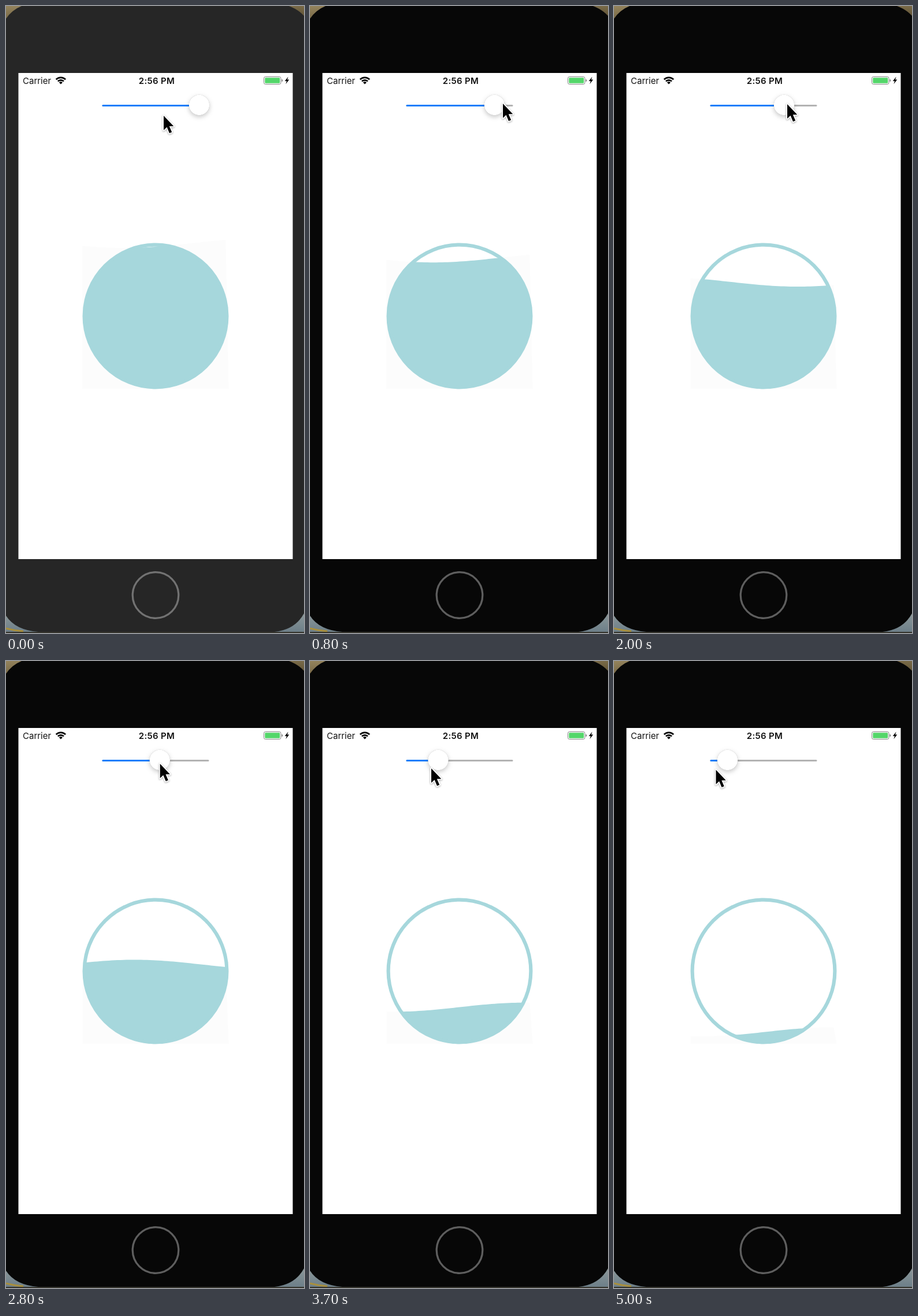
An HTML page for the animation above (5.1 s loop, 516 by 1086 pixels).

```html
<!DOCTYPE html>
<html lang="en">
<head>
<meta charset="utf-8">
<title>Water level slider</title>
<style>
  html, body { margin: 0; width: 100%; height: 100%; overflow: hidden; background: #070707; }
  svg { display: block; width: 516px; height: 1086px; }
  text { font: 15px Inter, Roboto, sans-serif; fill: #111; }
  .clock { font-weight: 600; letter-spacing: .3px; text-anchor: middle; }
  .wifi path { fill: none; stroke: #000; stroke-width: 2.7; }
  #thumb circle { filter: drop-shadow(0 3px 4px rgba(0, 0, 0, .17)) drop-shadow(0 0 .7px rgba(0, 0, 0, .35)); }
  #cursor { filter: drop-shadow(0 1.5px 1.5px rgba(0, 0, 0, .35)); }
</style>
</head>
<body>
<svg viewBox="0 0 516 1086">
  <defs>
    <clipPath id="disc"><circle cx="259" cy="537" r="125"/></clipPath>
    <linearGradient id="sand" x2="1" y2="1">
      <stop stop-color="#94835c"/><stop offset="1" stop-color="#5d5033"/>
    </linearGradient>
    <linearGradient id="sea" x2="0" y2="1">
      <stop stop-color="#8b9799"/><stop offset="1" stop-color="#6d7f89"/>
    </linearGradient>
  </defs>

  <!-- phone and the desktop showing at its corners -->
  <rect id="body" width="516" height="1086"/>
  <path fill="url(#sand)" d="M0 0H27Q10 7 0 22ZM516 0H490Q506 6 516 17Z"/>
  <path fill="url(#sea)" d="M0 1056Q16 1081 56 1084H0ZM516 1052Q501 1080 465 1084H516Z"/>
  <path fill="none" stroke="#a98f3c" stroke-width="3" d="M0 1078L14 1081L30 1083"/>
  <path fill="#35342d" d="M0 1084H516V1086H0Z"/>
  <circle id="home" cx="259" cy="1020.5" r="39.8" fill="none" stroke-width="3.3"/>
  <rect x="21.5" y="116" width="475" height="842" fill="#fff"/>

  <!-- status bar -->
  <text x="29" y="134.5">Carrier</text>
  <g class="wifi">
    <path d="M86.7 127.2A11.6 11.6 0 0 1 103.1 127.2M89.8 130.4A7.2 7.2 0 0 1 100 130.4"/>
    <path style="fill:#000;stroke:none" d="M94.9 135.5L91.9 132.4A4.3 4.3 0 0 1 97.9 132.4Z"/>
  </g>
  <text class="clock" x="261" y="134.5">2:56 PM</text>
  <rect x="446.5" y="122.5" width="29.5" height="13" rx="2.8" fill="#fff" stroke="#858585"/>
  <rect x="448.3" y="124.2" width="25.9" height="9.6" rx="1.4" fill="#53d669"/>
  <path fill="#777" d="M477.5 126.7Q479.3 127.2 479.3 129T477.5 131.3Z"/>
  <path d="M488.6 122.5L482.8 130H486L484.3 135.3L490.3 127.6H487Z"/>

  <!-- slider -->
  <rect x="166.5" y="171" width="185" height="3" rx="1.5" fill="#b3b3b3"/>
  <rect id="fill" x="166.5" y="171" height="3" rx="1.5" fill="#157efb"/>
  <g id="thumb"><circle cy="171.5" r="17.7" fill="#fff"/></g>

  <!-- tank -->
  <path id="haze" fill="#fcfcfc"/>
  <circle cx="259" cy="537" r="123.5" fill="#fff"/>
  <path id="water" fill="#a6d7dc" clip-path="url(#disc)"/>
  <circle cx="259" cy="537" r="123.4" fill="none" stroke="#a6d7dc" stroke-width="6.2"/>

  <g id="cursor">
    <path stroke="#fff" stroke-width="3.6" stroke-linejoin="round" paint-order="stroke"
      d="M0 0V25L5.6 19.8L10 30.2L14.2 28.4L9.8 18.2H17.3Z"/>
  </g>
</svg>
<script>
const LOOP = 5100, STEP = 100, PRESS = 400;
const LEFT = 132.5, RIGHT = 385.5, BASE = 663;
const AMP = 7.9, WAVELENGTH = 455;

// time, cursor x, cursor y, thumb x, trough x
const keys = [
  [0, 273, 190, 334.5, 205],
  [300, 349, 171, 334.5, 205],
  [450, 352, 169, 334.5, 205],
  [800, 334, 169, 319.5, 213],
  [2000, 300, 170, 294.5, 318],
  [2800, 266.7, 178, 266.3, 450],
  [3700, 210, 186, 222, 600],
  [4400, 202.2, 188.5, 214.3, 590],
  [5000, 176.5, 188.5, 196.5, 605]
];

const el = id => document.getElementById(id);
const set = (id, attrs) => {
  for (const name in attrs) el(id).setAttribute(name, attrs[name]);
};

function pose(t) {
  const i = Math.max(1, keys.findIndex(k => k[0] >= t));
  const a = keys[i - 1], b = keys[i];
  const u = (t - a[0]) / (b[0] - a[0]);
  return a.map((v, n) => v + (b[n] - v) * u);
}

function surface(level, trough) {
  let d = `M${LEFT} ${BASE}`;
  for (let x = LEFT; x <= RIGHT; x += 5.06) {
    const y = level + AMP * Math.cos((x - trough) / WAVELENGTH * 2 * Math.PI);
    d += `L${x.toFixed(2)} ${y.toFixed(2)}`;
  }
  return d + `L${RIGHT} ${BASE}Z`;
}

function draw(t) {
  const [, cx, cy, thumb, trough] = pose(t);
  const d = surface(436.6 + 1.675 * (319.3 - thumb), trough);
  const active = t >= PRESS;
  set('body', { fill: active ? '#070707' : '#262626' });
  set('home', { stroke: active ? '#5e5e5e' : '#727272' });
  set('fill', { width: thumb - 166.5 });
  set('thumb', { transform: `translate(${thumb} 0)` });
  set('cursor', { transform: `translate(${cx} ${cy})` });
  set('haze', { d });
  set('water', { d });
}

const start = performance.now();
function tick() {
  const t = (performance.now() - start) % LOOP;
  draw(Math.floor(t / STEP) * STEP);
  requestAnimationFrame(tick);
}
tick();
</script>
</body>
</html>
```
